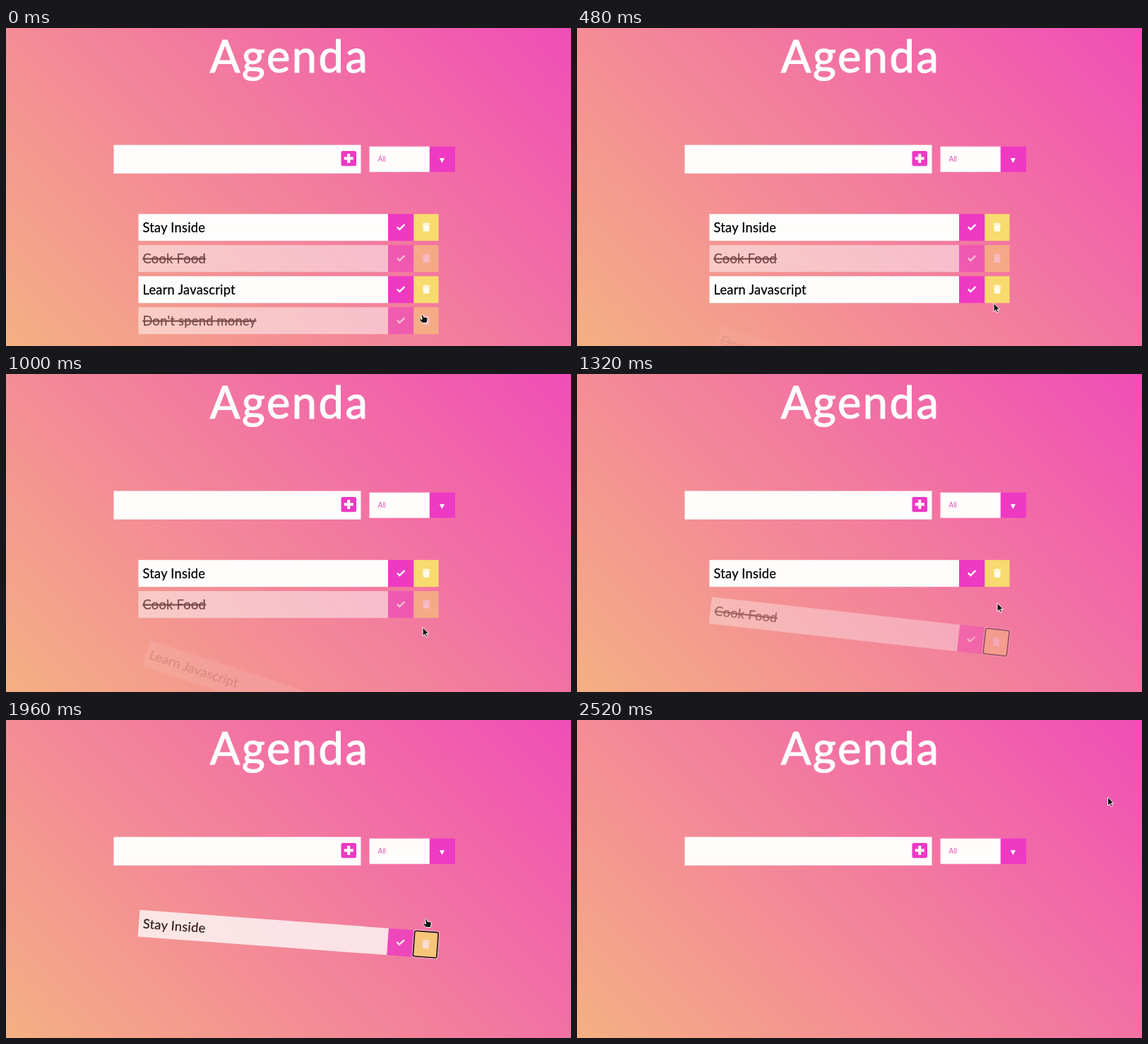
Recreate the animation shown at these times as an HTML page. Size 800 px wide and 450 px high, loop 2.56 s.

```html
<!DOCTYPE html>
<html lang="en">
<head>
<meta charset="utf-8">
<title>Agenda</title>
<style>
  html, body { margin: 0; width: 100%; height: 100%; overflow: hidden; background: #f37d9d; }
  svg { display: block; width: 100%; height: 100%; }
  text { font-family: Lato, "Open Sans", sans-serif; }
  .title { font-size: 63px; letter-spacing: 2.6px; fill: #fefdfd; stroke: #fefdfd; stroke-width: 1.2px; }
  .label { font-size: 18.3px; letter-spacing: .25px; fill: #000; stroke: #000; stroke-width: .25px; }
  .done { text-decoration: line-through; }
  .filter { font: 10px "Liberation Sans", Arial, sans-serif; fill: #e556b4; }
</style>
</head>
<body>
<svg viewBox="0 0 800 450" xmlns="http://www.w3.org/2000/svg">
  <defs>
    <linearGradient id="sky" gradientUnits="userSpaceOnUse" x1="87.5" y1="537.5" x2="712.5" y2="-87.5">
      <stop offset="0" stop-color="#f5b083"/>
      <stop offset="1" stop-color="#f04eb6"/>
    </linearGradient>
  </defs>
  <rect width="800" height="450" fill="url(#sky)"/>
  <text class="title" x="288.8" y="63">Agenda</text>

  <rect x="152.5" y="165.5" width="350" height="40.3" fill="#fefdfc"/>
  <rect x="474.5" y="174" width="21.5" height="21.3" rx="2.5" fill="#ee39c3"/>
  <path d="M478.7 184.6h13M485.2 178.1v13" stroke="#fff" stroke-width="4"/>

  <rect x="514.5" y="167.7" width="85.5" height="36" fill="#fefdfc"/>
  <rect x="599.7" y="167.7" width="36.3" height="36" fill="#ee39c3"/>
  <text class="filter" x="526.6" y="189">All</text>
  <path d="M613.8 184.2h7.2l-3.6 6.8z" fill="#fff"/>

  <g id="list"></g>

  <g id="cursor" stroke="#fff" stroke-width="1" stroke-linejoin="round" fill="#111">
    <path id="arrow" d="M0 0V12.2L2.8 9.6 4.7 13.8 6.7 12.9 4.9 8.8H8.6Z"/>
    <path id="hand" d="M-1 .6Q-.2-.6 1 .4L2.8 4 4.6 3.6 6 4.2 7.4 4.6 8 6.4 7.4 9.4 6.6 12H.6L-1.8 9.4-4 7.4Q-3.6 6-2 6.4L.2 7Z"/>
  </g>
</svg>
<script>
const LOOP = 2560, FALL = 500, DROP = 100, TURN = 20;
const $ = id => document.getElementById(id);

const tasks = [
  { text: "Stay Inside", y: 282.2, fall: 1880 },
  { text: "Cook Food", y: 326.2, fall: 1216, done: true },
  { text: "Learn Javascript", y: 370.2, fall: 680 },
  { text: "Don't spend money", y: 414.2, fall: 160, done: true }
];

// time, x, y of the pointer tip
const path = [
  [0, 589, 405.3], [160, 589.5, 406], [240, 590.3, 407.5], [400, 590.3, 407.5],
  [600, 589.5, 357], [780, 589.5, 357], [1000, 590, 358.5], [1170, 595, 324],
  [1520, 595, 324], [1800, 594.3, 281.5], [2120, 594.3, 281.5], [2500, 751.5, 109]
];
const hovers = [[0, 200], [510, 720], [1080, 1280], [1640, 2000]];

$("list").innerHTML = tasks.map(t => `
  <g>
    <rect x="-212.5" y="-19" width="353.7" height="38" fill="#fefdfc"/>
    <rect x="141" y="-19" width="36.5" height="38" fill="#ee39c3"/>
    <rect x="177.3" y="-19" width="35.2" height="38" fill="#f8db6e"/>
    <text class="label${t.done ? " done" : ""}" x="-206.5" y="6.5">${t.text}</text>
    <path d="M153.8 -.6l3.5 3.5 7-7" fill="none" stroke="#fff" stroke-width="2.5"/>
    <path d="M189.8-5.8h3l.8-.8h2.8l.8.8h3v1.5h-10.4zM190.4-3.8h9.2l-.4 8.2q-.1 1.2-1.3 1.2h-5.8q-1.2 0-1.3-1.2z" fill="#fff" opacity=".88"/>
    <g class="ring" fill="none">
      <rect x="176.8" y="-19.4" width="36" height="38.6" rx="3" stroke="#fff" stroke-width="1"/>
      <rect x="178" y="-18.2" width="33.6" height="36.2" rx="2" stroke="#000" stroke-width="1.8"/>
    </g>
  </g>`).join("");
const rows = [...$("list").children];

// cubic-bezier(.25, .1, .25, 1)
function ease(x) {
  if (x <= 0) return 0;
  if (x >= 1) return 1;
  const bez = (a, b, s) => 3 * a * s * (1 - s) ** 2 + 3 * b * s * s * (1 - s) + s ** 3;
  let lo = 0, hi = 1;
  for (let i = 0; i < 20; i++) {
    const mid = (lo + hi) / 2;
    if (bez(.25, .25, mid) < x) lo = mid; else hi = mid;
  }
  return bez(.1, 1, lo);
}

function pointer(t) {
  const i = path.findIndex(p => p[0] > t);
  if (i < 0) return path[path.length - 1].slice(1);
  const [a, b] = [path[i - 1], path[i]];
  let k = (t - a[0]) / (b[0] - a[0]);
  k = k * k * (3 - 2 * k);
  return [a[1] + (b[1] - a[1]) * k, a[2] + (b[2] - a[2]) * k];
}

const show = (el, on) => el.setAttribute("display", on ? "inline" : "none");

function draw(t) {
  tasks.forEach((task, i) => {
    const row = rows[i], k = ease((t - task.fall) / FALL);
    show(row, k < 1);
    row.setAttribute("transform", `translate(400 ${task.y + DROP * k}) rotate(${TURN * k})`);
    row.setAttribute("opacity", (task.done ? .5 : 1) * (1 - k));
    show(row.querySelector(".ring"), t >= task.fall - 60);
  });
  const over = hovers.some(([a, b]) => t >= a && t < b);
  show($("hand"), over);
  show($("arrow"), !over);
  $("cursor").setAttribute("transform", `translate(${pointer(t)})`);
}

const start = performance.now();
function tick() {
  draw((performance.now() - start) % LOOP);
  requestAnimationFrame(tick);
}
tick();
</script>
</body>
</html>
```
